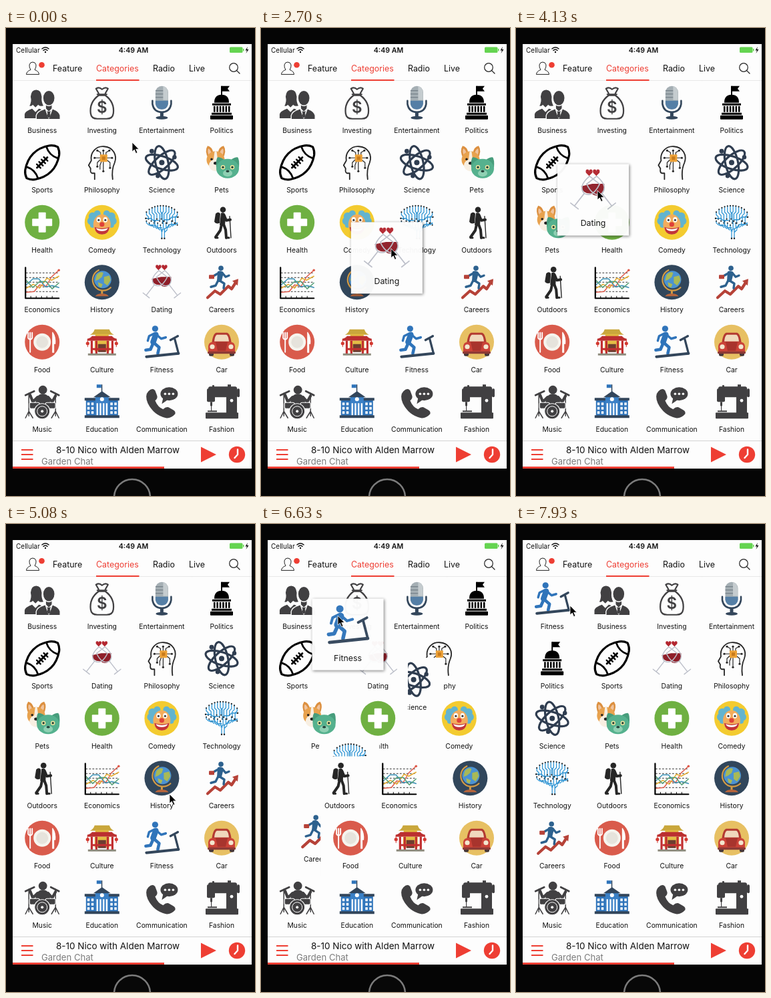
An HTML page for the animation above (8000 ms loop, 373x700 px).

```html
<!DOCTYPE html>
<html lang="en">
<head>
<meta charset="utf-8">
<title>Category grid</title>
<style>
html, body { margin: 0; width: 100%; height: 100%; overflow: hidden; background: #050505; }
svg { display: block; width: 373px; height: 700px; font-family: Inter, Roboto, sans-serif; }
</style>
</head>
<body>
<svg id="stage" viewBox="0 0 373 700"></svg>
<script>
const RED = '#ee3e33', INK = '#414042', NAVY = '#33465b', BLUE = '#2f74ba', PAPER = '#fdfdfd';

const fill = (d, color, extra = '') => `<path d="${d}" fill="${color}" ${extra}/>`;
const line = (d, color, w = 2, extra = '') =>
  `<path d="${d}" fill="none" stroke="${color}" stroke-width="${w}" stroke-linecap="round" stroke-linejoin="round" ${extra}/>`;
const dot = (x, y, r, color) => `<circle cx="${x}" cy="${y}" r="${r}" fill="${color}"/>`;
const oval = (x, y, rx, ry, color) => `<ellipse cx="${x}" cy="${y}" rx="${rx}" ry="${ry}" fill="${color}"/>`;
const box = (x, y, w, h, color, rx = 0) =>
  `<rect x="${x}" y="${y}" width="${w}" height="${h}" rx="${rx}" fill="${color}"/>`;
const text = (x, y, size, str, color = '#111', extra = '') =>
  `<text x="${x}" y="${y}" font-size="${size}" fill="${color}" ${extra}>${str}</text>`;
const turn = (deg, body, x = 0, y = 0) => `<g transform="translate(${x} ${y}) rotate(${deg})">${body}</g>`;
const flip = body => body + `<g transform="scale(-1 1)">${body}</g>`;
const each = (n, fn) => Array.from({ length: n }, (_, i) => fn(i)).join('');
const MID = 'text-anchor="middle"';

// Brain outline filled with circuit traces: domed top, bottom tapering to the stem
const circuit = () => each(12, i => {
  const x = -23 + i * 4.2, h = 18 * Math.sqrt(1 - (x / 26) ** 2), s = i < 6 ? 3 : -3;
  const top = -7 - h, mid = -5 + (i % 3) * 3, low = 14 - Math.abs(x) * .45;
  return line(`M${x} ${top}V${top + h * .5}l${s} 3V${mid}M${x} ${mid + 3}V${low - 3}l${s} 3`, '#2f95d4', 1.3)
    + dot(x, top, 1.1, '#222') + dot(x + s, mid, 1.1, '#222') + dot(x, mid + 3, 1, '#222');
}) + line('M-24-6h8l3 3h8M24-8h-9l-4 4h-8M-19 4h9l4 4h6M20 3h-8l-5 5M0 10V24M4 9V24M8 11L4 15', '#2f95d4', 1.3)
  + dot(0, 24, 1.2, '#222') + dot(4, 24, 1.2, '#222') + dot(-24, -6, 1.2, '#222') + dot(24, -8, 1.2, '#222');

const glass = turn(38, line('M-8-16Q-12 3 0 5Q12 3 8-16ZM0 5V24M-6 25H6', '#bcbfc9', 1.4), -8, 0);

const heart = (x, y) => fill('M0 4L-4 0Q-5-4-2-4Q0-4 0-2Q0-4 2-4Q5-4 4 0Z', '#b3262f', `transform="translate(${x} ${y})"`);

const items = {
  Business:
    `<g stroke="${PAPER}" stroke-width="1.4">`
    + fill('M-27 24V17Q-26 12-15 8L-10 13L-5 8L4 11V24Z', INK)
    + fill('M-20 5Q-16-1-18-9Q-17-20-9-20Q-1-20 0-9Q-1-1 3 5Q-3 7-6 4L-10 8L-14 4Q-16 7-20 5Z', INK)
    + fill('M-9 25V19Q-8 13 4 9H16Q26 13 27 19V25Z', INK) + fill('M5 0H15V9L10 14L5 9Z', INK) + oval(10, -7, 9, 11.5, INK) + '</g>'
    + line('M5 9L10 23L15 9', PAPER, 1.6) + fill('M8.500 13h3l1 7-2.500 3-2.500-3z', INK),
  Investing:
    line('M-5-11C-16-3-18 8-17 16Q-16 24-7 24H7Q16 24 17 16C18 8 16-3 5-11ZM-5-14L-9-21Q-4-24 0-20Q5-24 9-21L5-14M-7-12.500H7', INK, 2.2)
    + text(0, 15, 24, '$', INK, MID + ' font-weight="600"'),
  Entertainment:
    box(-9.5, -25, 19, 35, '#a5afb4', 9.5) + line('M-9-18H2M-9-13H2M-9-8H2', '#69767e', 1.2)
    + fill('M2-25Q9-23 9-15V-4H2Z', '#c5cccf') + fill('M-9.500-3H9.500V2Q8 10 0 10T-9.500 2Z', '#557fa6')
    + line('M-14-3V2Q-12 14 0 14T14 2V-3', NAVY, 2.6) + box(-2.5, 14, 5, 8, NAVY) + oval(0, 22.5, 9, 2.6, NAVY),
  Politics:
    box(-1, -25, 2, 14, '#000') + fill('M0-25H12L9-21L12-17H0Z', '#000') + fill('M-11 0Q-11-12 0-12T11 0Z', '#000')
    + box(-14, 1, 28, 3, '#000') + each(6, i => box(-12 + i * 4.4, 5, 2.5, 9, '#000'))
    + box(-15, 15, 30, 3, '#000') + box(-17, 19, 34, 6, '#000', 1),
  Sports:
    turn(-45, line('M-33 0Q-31-6-26-10Q-13-19 0-19T26-10Q31-6 33 0Q31 6 26 10Q13 19 0 19T-26 10Q-31 6-33 0Z', '#000', 3.2)
    + line('M-21-12Q-15 0-21 12M21-12Q15 0 21 12M-11 0H11', '#000', 2.8)
    + line('M-7.500-4V4M-2.500-4V4M2.500-4V4M7.500-4V4', '#000', 2.4)),
  Philosophy:
    line('M-11 25V16H-15Q-18 15-17 9L-20 4L-16-3C-18-15-9-25 3-24C17-23 23-11 19 0Q14 11 16 25', '#262626', 1.8)
    + line('M2-11V-18M-2-11V-15L-7-18M6-11V-15L11-18M-3-7H-11M-3-4L-7 0V6M7-7H15M7-4L12 0V8M2-1V13M-1-1L-3 4V10', '#262626', 1.2)
    + [[2, -18], [-7, -18], [11, -18], [-11, -7], [-7, 6], [15, -7], [12, 8], [2, 13]].map(p => dot(...p, 1.6, '#262626')).join('')
    + box(-3, -12, 11, 11, '#eda238', 1) + box(0, -9, 5, 5, '#c97b1c'),
  Science:
    [18, 78, 138].map(a => turn(a, line('M-25 0A25 9.500 0 1 1 25 0A25 9.500 0 1 1-25 0Z', '#2f3d50', 3.2))).join('')
    + dot(0, 0, 4, '#2f3d50') + dot(-15, -17, 3.4, '#2f3d50') + dot(19, -8, 3.2, '#2f3d50') + dot(-6, 20, 3.2, '#2f3d50'),
  Pets:
    fill('M-21-25Q-14-24-12-13L-20-6Q-26-18-21-25ZM3-25Q-4-24-6-13L2-6Q8-18 3-25Z', '#dc9040')
    + fill('M-20-21Q-16-19-15-13L-19-10Q-22-17-20-21ZM2-21Q-2-19-3-13L1-10Q4-17 2-21Z', '#f0c39c')
    + oval(-9, -4, 13.5, 13, '#e8a24e') + oval(-9, 4, 10, 9, '#f8efe2') + fill('M-10.500-17H-7.500L-5 4H-13Z', '#f8efe2')
    + dot(-15, -5, 1.7, '#222') + dot(-3, -5, 1.7, '#222') + oval(-9, 1, 3, 2.2, '#222')
    + fill('M-8 8Q-9-5-6-8Q0-8 5-3ZM26 8Q27-5 24-8Q18-8 13-3Z', '#479d7c') + oval(9, 9, 17, 14.5, '#55b18e')
    + dot(2, 7, 3.2, '#f0e6a0') + dot(16, 7, 3.2, '#f0e6a0') + dot(2, 7, 1.7, '#23423a') + dot(16, 7, 1.7, '#23423a')
    + oval(9, 16, 7, 5, '#8fd0b3') + oval(9, 13, 2.6, 1.7, '#23423a'),
  Health: dot(0, 0, 26, '#6fb042') + box(-15, -5.5, 30, 11, '#fff', 1) + box(-5.5, -15, 11, 30, '#fff', 1),
  Comedy:
    dot(0, 0, 26, '#f3cb30')
    + flip(dot(-14, -9, 6, '#62b4cf') + dot(-16, -2, 6, '#62b4cf') + dot(-7, -13, 5, '#62b4cf') + dot(-14, 4, 4, '#62b4cf'))
    + oval(0, 3, 13, 15, '#f2ac5c') + flip(oval(-5, -4, 3.2, 4, '#fff') + dot(-5, -3.5, 1.6, '#333'))
    + fill('M-11 7Q0 11 11 7Q10 18 0 18T-11 7Z', '#c2353a') + fill('M-9 8.500Q0 12 9 8.500Q7 13 0 13T-9 8.500Z', '#fff') + dot(0, 3, 3.6, '#df4038'),
  Technology: circuit(),
  Outdoors:
    dot(2, -19, 4.3, '#262626') + fill('M-9-13Q-5-17-2-13L-3 1Q-9 3-11-1Z', '#262626')
    + fill('M-1-14Q5-16 6-9L5 4L-3 4Z', '#262626') + line('M0 3L-2 12L-9 22M3 3L6 11L7 23M4-10L7-3L13-4', '#262626', 4)
    + line('M12-9L14 23', '#262626', 1.4) + line('M-9 23H-6M7 23H11', '#262626', 3),
  Economics:
    line('M-24-14H24M-24-7H24M-24 0H24M-24 7H24M-24 14H24', '#333', 1, 'stroke-dasharray="2 3"')
    + line('M-24 15L-12 14L-4 4L6 6L14-8L25-18', '#df5a4a', 1.5) + line('M-24 9L-13 3L-4 9L7-6L14-3L25-9', '#e6ad33', 1.5)
    + line('M-24 4L-14-5L-5-5L5 7L15 5L25 8', '#3b93b8', 1.5) + line('M-24-3L-14 8L-4-1L6-1L15 10L25 1', '#55a078', 1.5)
    + dot(25, -18, 1.8, '#df5a4a') + line('M-25-22V24H25', '#000', 2.2) + line('M-17 24V21M-9 24V21M-1 24V21M7 24V21M15 24V21', '#000', 1),
  History:
    dot(0, 0, 26, '#31465b') + line('M-5-18A16 16 0 1 0 13 8', '#d39b45', 2.2)
    + dot(1, -4, 13, '#4b92d2') + fill('M-8-11Q-2-17 2-14L0-8L-5-4L-10-2ZM3-8L11-10L13-3L8 5L3 1ZM-6 0L1 3L-1 8L-5 6Z', '#a8b957')
    + box(-1.5, 12, 3, 6, '#d39b45') + fill('M-10 21Q-8 17 0 17T10 21Z', '#b7653c'),
  Dating:
    fill('M-15-5L-1-8L14-8Q15 1 8 6Q2 8-2 4Q-13 5-15-5Z', '#8f1f29') + flip(glass) + heart(-5, -22) + heart(4, -22),
  Careers:
    line('M-21 23L-10 13L-2 18L10 6L15 10L22-1', '#b64238', 4.2) + fill('M16-2L25-5L24 5Z', '#b64238')
    + dot(-1, -21, 3.8, '#2d618e') + fill('M-6-16Q0-19 3-14L0-2H-7Z', '#2d618e')
    + line('M-4-3L4 2L3 9M-5-3L-9 5L-16 7M1-14L6-8L11-10M-4-14L-11-10', '#2d618e', 3.4) + box(-19, -11, 8, 6, '#b64238', 1),
  Food:
    dot(0, 0, 26, '#d95b4c') + dot(0, 0, 13, '#f6f4ee') + dot(0, 0, 9, '#e6e3dc')
    + line('M-18-4V15M-21-14V-6Q-18-1-15-6V-14M-18-14V-5', '#fff', 1.9) + fill('M16-15Q21-8 20 3H18V16H15V-15Z', '#fff'),
  Culture:
    fill('M-18-11Q-13-13-11-19H11Q13-13 18-11Z', '#c9a73c') + box(-10, -12, 20, 5, '#e0b83f')
    + fill('M-22-5Q-17-6-15-9H15Q17-6 22-5V-2H-22Z', '#bb2f30') + box(-11, -2, 22, 16, '#e4bd45') + box(-6, 3, 12, 12, '#6d3d30')
    + [-17, -10, 7, 14].map(x => box(x, -2, 3.2, 20, '#c22f30')).join('') + box(-14, 9, 28, 3, '#c22f30')
    + flip(dot(-21.5, 2, 2.6, '#d33a31') + line('M-21.500-3V7', '#d33a31', 1)) + box(-21, 17, 42, 3, '#8d8a7c'),
  Fitness:
    dot(-10, -20, 4.6, BLUE) + line('M-9-11L-13 0', BLUE, 8.5) + line('M-12 1L-4 8L-6 17M-13 2L-17 11L-24 12', BLUE, 4.6)
    + line('M-9-12L-1-5L6-7M-11-13L-19-9L-21-2', BLUE, 3.4)
    + line('M-23 22L25 17', NAVY, 4) + line('M25 17L19-6M13-3L24-9', NAVY, 3.2),
  Car:
    dot(0, 0, 26, '#e7c063') + fill('M-15 3Q-13-13-8-14H8Q13-13 15 3Z', '#b33a31') + fill('M-11-1Q-10-10-7-11H7Q10-10 11-1Z', '#f0d9bd')
    + fill('M-20 15V6Q-19-1-12 0H12Q19-1 20 6V15Z', '#cb4338') + box(-19, 15, 7, 6, '#443638', 2) + box(12, 15, 7, 6, '#443638', 2)
    + fill('M-9 0H9L6 13H-6Z', '#a8342d') + flip(dot(-14, 7, 3.6, '#f3e7cf')) + box(-21, 14, 42, 3.5, '#8d3a35', 1.5),
  Music:
    dot(1, -18, 6.4, INK) + fill('M-10 8Q-11-12 1-12T12 8Z', INK) + line('M-7-7L-14 0L-18-10M9-7L15 0L20-9', INK, 4.2)
    + line('M-25-10L-12-16M13-16L25-10', INK, 2.8) + line('M-20-13V21M20-13V21M-20 14L-25 24M-20 14L-14 24M20 14L25 24M20 14L14 24', INK, 1.5)
    + `<g stroke="${PAPER}" stroke-width="1.2">` + box(-19, 1, 15, 9, INK, 2) + box(5, 1, 15, 9, INK, 2) + dot(0, 14, 11.5, INK) + '</g>'
    + `<circle cy="14" r="7.500" fill="none" stroke="${PAPER}"/>` + dot(0, 14, 2, PAPER),
  Education:
    box(-24, -3, 48, 24, BLUE) + box(-26, -6, 52, 4, NAVY) + box(-10, -8, 20, 29, '#3a80c6') + fill('M-13-7L0-16L13-7Z', NAVY)
    + each(3, r => flip([-22, -16].map(x => box(x, 1 + r * 6.5, 3.5, 4, '#fff')).join(''))) + dot(0, -4, 3, '#fff')
    + each(4, i => box(-8.2 + i * 4.7, 2, 2.4, 18, '#fff')) + box(-26, 20, 52, 4, NAVY) + box(-1, -26, 1.5, 12, NAVY) + box(-8, -26, 7, 5, BLUE),
  Communication:
    fill('M-20-16Q-26-10-21 2Q-12 20 6 24Q14 25 20 18Q21 14 17 12L10 8Q6 7 2 11Q-6 8-10-2Q-6-5-7-9L-10-17Q-14-22-20-16Z', INK)
    + oval(11, -12, 13, 10, INK) + fill('M2-6L0 3L10-4Z', INK) + each(3, i => dot(5 + i * 6, -12, 1.8, PAPER)),
  Fashion:
    box(-24, 16, 49, 9, INK, 1) + box(7, -21, 16, 38, INK) + box(-20, -23, 43, 16, INK, 3) + box(-22, -20, 12, 20, INK, 2)
    + box(23, -20, 4, 13, INK, 2) + box(-17, 0, 3, 6, INK) + box(-16, 5, 1.2, 9, INK) + box(-21, 13, 14, 2, INK)
    + box(9, -26, 5, 4, INK) + box(-14, -25, 3, 4, INK) + dot(15, -2, 2.4, PAPER),
};

const chrome =
  box(10, 24, 358, 635, PAPER)
  + text(15, 36.6, 10, 'Cellular')
  + line('M54 31Q59 27 64 31M56 33.500Q59 31 62 33.500', '#111', 1.6) + dot(59, 36, 1.2, '#111')
  + text(191, 36.6, 10.6, '4:49 AM', '#111', MID + ' font-weight="600"')
  + box(335, 28.5, 19.5, 8.5, '#65d451', 1.5) + box(355, 31, 1.5, 3.5, '#65d451')
  + fill('M362 28L358.500 33.500H361L359.500 38L363.500 32H361Z', '#111')
  + line('M30.500 69Q31 64.500 37 62.500Q34.500 59 35 55Q36 51 40 51T45 55Q45.500 59 43 62.500Q49 64.500 49.500 69Z', '#222', 1)
  + dot(53.5, 55.3, 4.3, RED)
  + text(70, 65, 12.4, 'Feature') + text(135, 65, 12.4, 'Categories', RED) + text(220, 65, 12.4, 'Radio') + text(274, 65, 12.4, 'Live')
  + '<circle cx="341" cy="59" r="6.300" fill="none" stroke="#222" stroke-width="1.200"/>' + line('M345.600 63.600L350 68', '#222', 1.3)
  + box(10, 78.6, 358, 1, '#c9c9c9') + box(135, 77, 64.5, 2, RED)
  + box(10, 617, 358, 1, '#d4d4d4') + each(3, i => box(23, 630 + i * 7, 17.5, 2, RED))
  + text(167.5, 635.5, 13.5, '8-10 Nico with Alden Marrow', '#111', MID) + text(53, 653, 13.1, 'Garden Chat', '#7c7c7c')
  + fill('M292 626.500L315 638L292 649.500Z', RED) + dot(346, 638, 12.2, RED) + line('M347 630.500V638L342.500 643', '#fff', 2.4)
  + box(10, 656, 227, 3, RED)
  + '<circle cx="189" cy="702" r="27" fill="#080808" stroke="#7b7b7b" stroke-width="2.500"/>';

const stage = document.getElementById('stage');
stage.innerHTML = '<clipPath id="view"><rect x="10" y="79" width="358" height="538"/></clipPath>'
  + chrome + '<g id="grid" clip-path="url(#view)">'
  + Object.entries(items).map(([name, art]) =>
    `<g>${box(-44.8, -44.75, 89.6, 89.5, PAPER)}<g transform="translate(0 -12)">${art}</g>${text(0, 33, 10.35, name, '#111', MID)}</g>`).join('')
  + '</g><g id="cursor">' + fill('M0 0V14L3.300 11L5.600 16.500L8 15.500L5.600 10.300H10Z', '#000', 'stroke="#fff" stroke-width=".8"') + '</g>';

const grid = document.getElementById('grid');
const cursor = document.getElementById('cursor');
const cells = [...grid.children];

const LOOP = 8000, STEP = 118.3, SHIFT = 300, LIFT = 240;
const drags = [
  { cell: 14, pick: 2100, drop: 4145, dx: -6.5, dy: 14 },
  { cell: 18, pick: 5900, drop: 7380, dx: 15, dy: 28 },
];
// [time, slot left, slot entered] of the dragged cell
const reflows = [[2720, 14, 9], [3108, 9, 5], [6386, 18, 14], [6432, 14, 10], [6505, 10, 5], [6680, 5, 1], [7120, 1, 0]];
const pointer = [
  [0, 189, 171], [470, 171, 235], [830, 183, 332], [1300, 215, 362], [1774, 240, 378.5], [2480, 240, 378.5],
  [2720, 195, 330], [3080, 137, 272], [3194, 125, 251.5], [3430, 121, 247], [4140, 122, 243], [4370, 130, 246],
  [4850, 207, 317], [4970, 207, 317], [5087, 245, 404], [5330, 244, 482], [5560, 222, 462], [6270, 222, 462],
  [6391, 200, 390], [6505, 150, 235], [6625, 115, 137], [6870, 100, 118], [7100, 80, 112], [7400, 81, 122], [LOOP, 81, 122],
];

const mix = (a, b, k) => a + (b - a) * k;
const mix2 = (p, q, k) => [mix(p[0], q[0], k), mix(p[1], q[1], k)];
const ease = k => { k = Math.min(1, Math.max(0, k)); return k * k * (3 - 2 * k); };
const slotAt = s => [54.2 + 89.6 * (s % 4), 123.75 + 89.5 * Math.floor(s / 4)];

function pointerAt(t) {
  const i = pointer.findIndex((p, n) => n && t <= p[0]);
  const [a, b] = [pointer[i - 1], pointer[i]];
  return mix2(a.slice(1), b.slice(1), (t - a[0]) / (b[0] - a[0]));
}

function cellAt(index, t) {
  let slot = index, pos = slotAt(slot);
  for (const [at, from, to] of reflows) {
    if (t < at) break;
    if (slot === from) pos = slotAt(slot = to);
    else if (slot >= to && slot < from) pos = mix2(pos, slotAt(++slot), ease((t - at) / SHIFT));
  }
  return pos;
}

let raised = 0;
function stack(count) {
  if (count === raised) return;
  raised = count;
  grid.append(...cells, ...drags.slice(0, count).map(d => cells[d.cell]));
}

function draw(time) {
  const t = Math.floor((time + 22) / STEP) * STEP;
  const tip = pointerAt(t);
  stack(drags.filter(d => t >= d.pick).length);
  cells.forEach((cell, i) => {
    let pos = cellAt(i, t), lift = 0;
    const drag = drags.find(d => d.cell === i);
    if (drag) {
      lift = ease((t - drag.pick) / LIFT) * (1 - ease((t - drag.drop) / LIFT));
      pos = mix2(pos, [tip[0] + drag.dx, tip[1] + drag.dy], lift);
      cell.style.filter = lift ? `drop-shadow(1px 1.5px 2px rgba(0,0,0,${.5 * lift}))` : '';
      cell.style.opacity = 1 - .03 * lift;
    }
    cell.setAttribute('transform', `translate(${pos}) scale(${1 + .195 * lift})`);
  });
  cursor.setAttribute('transform', `translate(${tip})`);
}

function tick() {
  draw(performance.now() % LOOP);
  requestAnimationFrame(tick);
}
tick();
</script>
</body>
</html>
```
